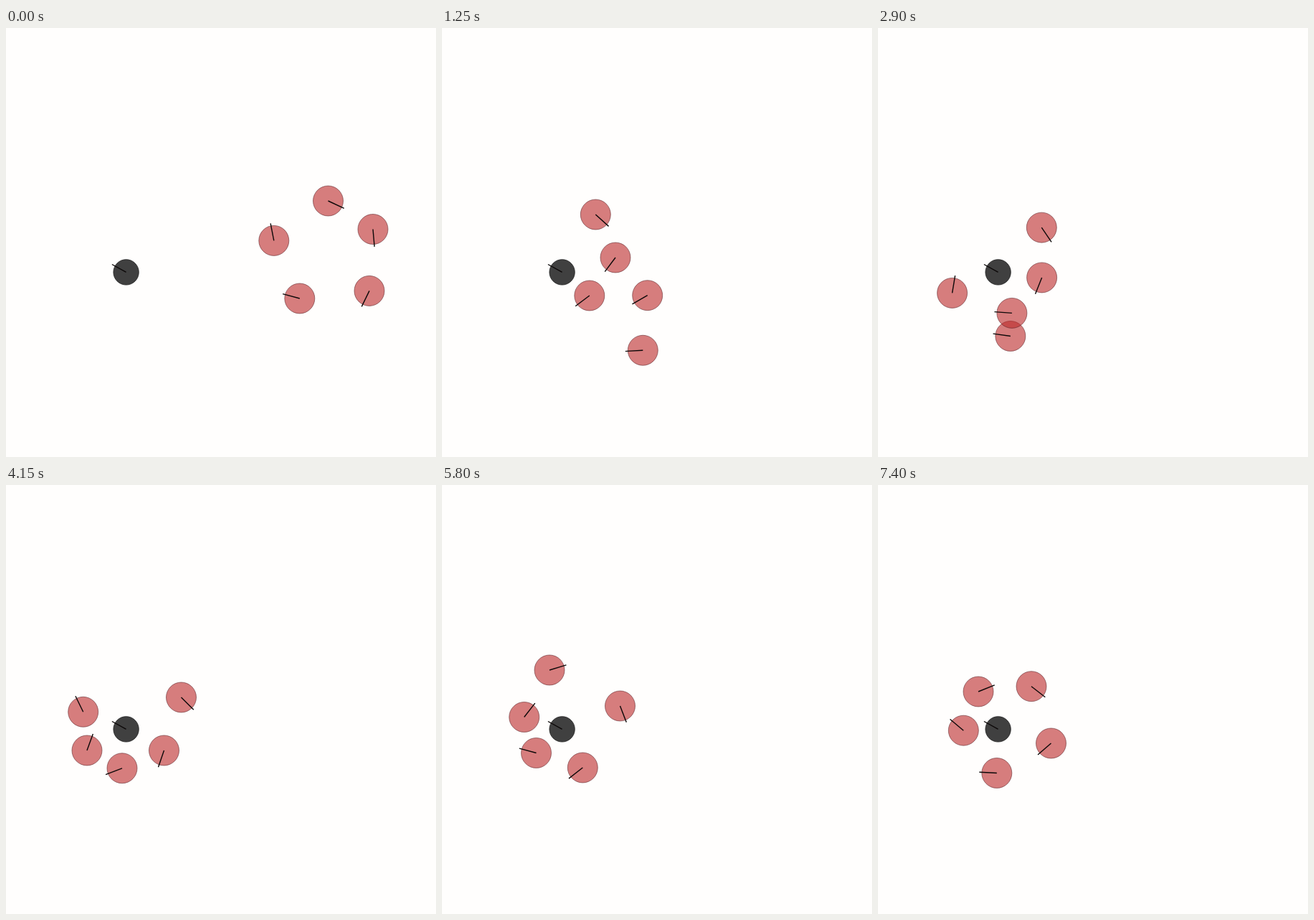
Write an HTML page that moves like this. It is 600 px wide and 598 px high and loops after 7450 ms.

```html
<!DOCTYPE html>
<html lang="en">
<head>
<meta charset="utf-8">
<title>Circling agents</title>
<style>
  html, body { margin: 0; width: 100%; height: 100%; overflow: hidden; background: #fffefd; }
  svg { display: block; width: 100%; height: 100%; }
  circle { stroke-width: .8; }
  .agent { fill: #bb2828; fill-opacity: .6; stroke: #5a2024; stroke-opacity: .7; }
  .goal { fill: #404040; stroke: #202020; }
  line { stroke: #0c0808; stroke-width: 1.4; }
</style>
</head>
<body>
<svg id="stage" viewBox="0 0 600 598"></svg>
<script>
const LOOP = 7450, STEP = 50;
const AGENT_RADIUS = 21, AGENT_POINTER = 24.5;
const GOAL_RADIUS = 17.7, GOAL_POINTER = 22.5;

// Agents drive like unicycles: each leg leaves and arrives along the pose heading.
// A pose is x, y, heading in degrees; brake > 1 slows the approach to the goal.
const POSE_TIMES = [0, 1250, 2300, 4150, 5800, 7400];
const agents = [
  { brake: 2, poses: [[373.8, 296.4, -101], [214.3, 260, 42], [223.3, 268, 73],
                      [244.5, 296, 45], [248.5, 308, 69], [214 + 27.5, 360, 139]] },
  { brake: 1.6, poses: [[449.5, 241, 25], [242, 320, 127], [233, 337.5, 114],
                        [220.5, 370, 109], [196.3, 394, 142], [165.8, 401.5, 183]] },
  { brake: 1.3, poses: [[512, 280.5, 85], [286.7, 372.7, 150], [225.5, 418, 123],
                        [113, 370, 290], [114.7, 323.5, 308], [140, 288, 338]] },
  { brake: 1, poses: [[507, 366.4, 116], [280.3, 449.3, 177], [105.7, 394, 244],
                      [107.7, 316.3, 244], [150, 258, 343], [214, 280.7, 38]] },
  { brake: 1.6, poses: [[409.8, 377, 195], [205.8, 373, 143], [196, 394, 126],
                        [162, 394.8, 159], [131.5, 373.5, 195], [119.3, 342.2, 220]] }
];

const svg = document.getElementById("stage");
const radians = degrees => degrees * Math.PI / 180;

function add(tag, attrs) {
  const node = document.createElementNS("http://www.w3.org/2000/svg", tag);
  for (const key in attrs) node.setAttribute(key, attrs[key]);
  return svg.appendChild(node);
}

// Point and direction at u on the cubic between two poses.
function drive([x0, y0, h0], [x1, y1, h1], u) {
  const reach = Math.hypot(x1 - x0, y1 - y0), v = 1 - u;
  const along = (p, q, trig) => {
    const m = reach * trig(radians(h0)), n = reach * trig(radians(h1));
    return {
      at: v * v * (1 + 2 * u) * p + u * u * (3 - 2 * u) * q + u * v * (v * m - u * n),
      rate: 6 * u * v * (q - p) + v * (1 - 3 * u) * m + u * (3 * u - 2) * n
    };
  };
  const x = along(x0, x1, Math.cos), y = along(y0, y1, Math.sin);
  return [x.at, y.at, Math.atan2(y.rate, x.rate)];
}

function locate({ poses, brake }, time) {
  let leg = 0;
  while (leg < poses.length - 2 && time >= POSE_TIMES[leg + 1]) leg++;
  const from = POSE_TIMES[leg], to = POSE_TIMES[leg + 1];
  const progress = Math.min(1, (time - from) / (to - from));
  const u = leg === 0 ? 1 - (1 - progress) ** brake : progress;
  return drive(poses[leg], poses[leg + 1], u);
}

function place(body, pointer, x, y, angle, length) {
  body.setAttribute("cx", x);
  body.setAttribute("cy", y);
  pointer.setAttribute("x1", x);
  pointer.setAttribute("y1", y);
  pointer.setAttribute("x2", x + length * Math.cos(angle));
  pointer.setAttribute("y2", y + length * Math.sin(angle));
}

const goal = add("circle", { class: "goal", r: GOAL_RADIUS });
for (const agent of agents) agent.body = add("circle", { class: "agent", r: AGENT_RADIUS });
for (const agent of agents) agent.pointer = add("line", {});
place(goal, add("line", {}), 167.6, 340.4, radians(209), GOAL_POINTER);

function render(time) {
  for (const agent of agents) {
    place(agent.body, agent.pointer, ...locate(agent, time), AGENT_POINTER);
  }
}

const start = performance.now();
function tick() {
  const time = (performance.now() - start) % LOOP;
  render(Math.floor(time / STEP) * STEP);
  requestAnimationFrame(tick);
}
tick();
</script>
</body>
</html>
```
